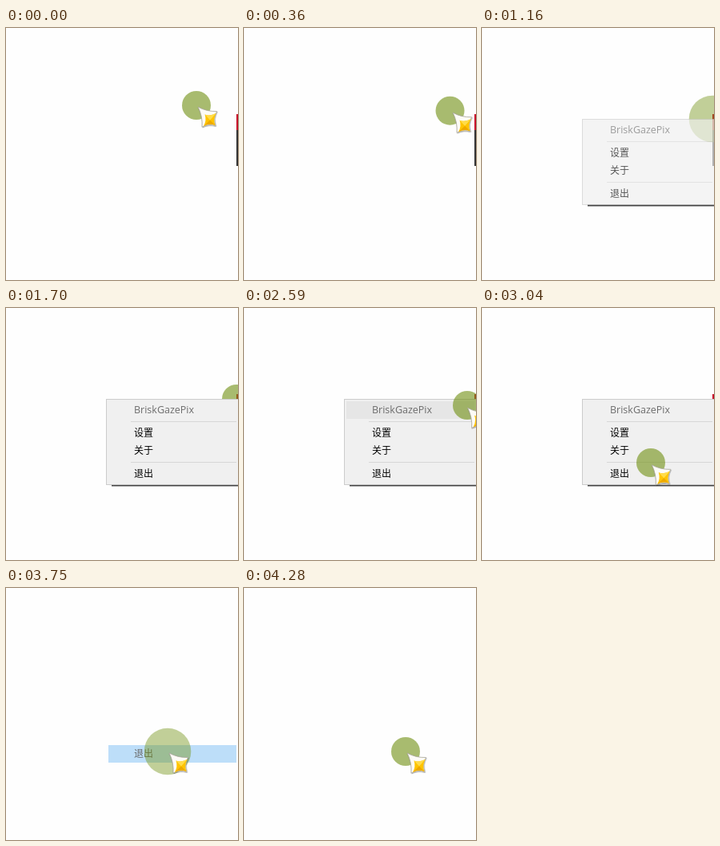
These frames come from a looping animation (290x316 px, 4.37 s). An HTML page:

```html
<!DOCTYPE html>
<html lang="zh-CN">
<head>
<meta charset="utf-8">
<title>Tray menu</title>
<style>
  html, body { margin: 0; width: 290px; height: 316px; overflow: hidden; background: #fefefe; }
  svg { display: block; }
  text { font: 12px "Noto Sans CJK SC", "Noto Sans CJK", "Noto Sans", sans-serif; fill: #000; }
  #name { font: 12.5px "Open Sans", "Noto Sans", sans-serif; fill: #6d6d6d; }
  .halo { fill: rgb(112, 143, 17); }
</style>
</head>
<body>
<svg width="290" height="316" viewBox="0 0 290 316">
  <defs>
    <filter id="soft" x="-5%" y="-200%" width="110%" height="500%"><feGaussianBlur stdDeviation="0.7"/></filter>
    <filter id="drop" x="-30%" y="-30%" width="160%" height="160%">
      <feDropShadow dx="0.5" dy="0.8" stdDeviation="0.7" flood-opacity="0.4"/>
    </filter>
  </defs>

  <g id="panel">
    <rect y="108" width="110" height="20" fill="#c8102a"/>
    <rect y="128" width="110" height="45" fill="#333"/>
  </g>
  <circle id="under" class="halo"/>

  <rect id="shade" x="132" y="221.5" width="170" height="2" fill="#444" filter="url(#soft)"/>
  <g id="menu">
    <rect x="125.5" y="114.5" width="166" height="107" fill="#f0f0f0" stroke="#ccc"/>
    <rect id="hover" x="128" width="160" height="22"/>
    <path d="M156 142.5H288M156 193.5H288" stroke="#d7d7d7"/>
    <text id="name" x="160" y="132">BriskGazePix</text>
    <text x="160" y="161">设置</text>
    <text x="160" y="183">关于</text>
    <text x="160" y="212">退出</text>
  </g>
  <g id="chosen">
    <rect x="128" y="197" width="160" height="22" fill="#91c9f7"/>
    <text x="160" y="212">退出</text>
  </g>

  <circle id="over" class="halo"/>
  <g id="cursor" filter="url(#drop)">
    <path d="M0 0Q11 6 23.500 5.500Q18.500 14 22 23.500Q13 21 5 25Q6 12 0 0Z" fill="#fcfbf6" stroke="#aaa79c" stroke-width=".8"/>
    <path d="M8.500 9.500Q15 12 22.500 8Q18.500 16 21.500 23Q14 20 7 24Q11 17 8.500 9.500Z" fill="#ffc400"/>
    <path d="M8.500 9.500Q15 12 22.500 8L15 16.500Z" fill="#ffdc4a"/>
    <path d="M21.500 23Q14 20 7 24L15 16.500Z" fill="#eda900"/>
  </g>
</svg>

<script>
// All moments below are counted in ticks.
const LOOP = 4370, TICKS = 49;
const PEEK = 9, OPEN = 11, RAISE = 24, PICK = 40, CLOSE = 41;

// key points of the pointer: tick, x, y
const path = [
  [0, 238, 97], [8, 285, 113], [9, 288, 114], [26, 288, 114],
  [29, 279, 122], [32, 230, 174], [34, 211, 194], [38, 202, 205]
];
const rowTops = [117, 146, 168, 197], ROW = 22;

const clamp = v => Math.max(0, Math.min(1, v));
const parts = {};
for (const el of document.querySelectorAll('svg > [id]')) parts[el.id] = el;
parts.hover = document.getElementById('hover');
const set = (id, attrs) => { for (const k in attrs) parts[id].setAttribute(k, attrs[k]); };

// Monotone cubic curve through the key points, at rest at both ends.
function slope(i, axis) {
  if (i === 0 || i === path.length - 1) return 0;
  const [a, b] = [i - 1, i].map(j =>
    (path[j + 1][axis] - path[j][axis]) / (path[j + 1][0] - path[j][0]));
  return a * b > 0 ? 2 * a * b / (a + b) : 0;
}

function pointer(n) {
  const next = path.findIndex(p => p[0] > n);
  if (next < 0) return path.at(-1).slice(1);
  const i = next - 1, a = path[i], b = path[next];
  const span = b[0] - a[0], u = (n - a[0]) / span, v = 1 - u;
  return [1, 2].map(k =>
    a[k] * v * v * (1 + 2 * u) + b[k] * u * u * (3 - 2 * u) +
    span * u * v * (slope(i, k) * v - slope(next, k) * u));
}

// A click swells the halo, lets it fade out, then the plain halo returns.
function halo(n) {
  const dt = n - (n >= PICK ? PICK : OPEN);
  if (dt < 0 || dt >= 8) return { r: 18, alpha: .6 };
  return { r: 29.3 - .9 * (dt - 2) ** 2, alpha: dt < 6 ? .6 - .085 * dt : 0 };
}

function draw(n) {
  const [x, y] = pointer(n);
  const { r, alpha } = halo(n);

  const shown = n > OPEN && n < CLOSE;
  set('shade', { opacity: +shown });
  set('menu', { opacity: shown ? clamp((n - OPEN) / 3) : 0 });

  const row = rowTops.findIndex(top => y >= top && y < top + ROW);
  set('hover', {
    y: rowTops[Math.max(row, 0)],
    fill: row < 0 ? 'none' : row === 0 ? '#e6e6e6' : '#91c9f7'
  });

  const left = n >= PEEK && n < OPEN ? 191 : 288;
  set('panel', { transform: `translate(${left})`, opacity: +(n < CLOSE) });
  set('chosen', { opacity: n < CLOSE ? 0 : clamp(.85 - .26 * (n - CLOSE)) });

  // the fresh menu covers the halo until the halo is raised again
  const covered = n > OPEN && n < RAISE;
  const spot = { cx: x, cy: y, r };
  set('under', { ...spot, opacity: covered ? alpha : 0 });
  set('over', { ...spot, opacity: covered ? 0 : alpha });

  const [px, py] = pointer(n + .2);
  set('cursor', { transform: `translate(${px + 2} ${py + 2})`, opacity: +(x < 284) });
}

const start = performance.now();
function tick() {
  const t = (performance.now() - start) % LOOP;
  draw(Math.min(TICKS - 1, Math.floor((t + 5) / LOOP * TICKS)));
  requestAnimationFrame(tick);
}
tick();
</script>
</body>
</html>
```
